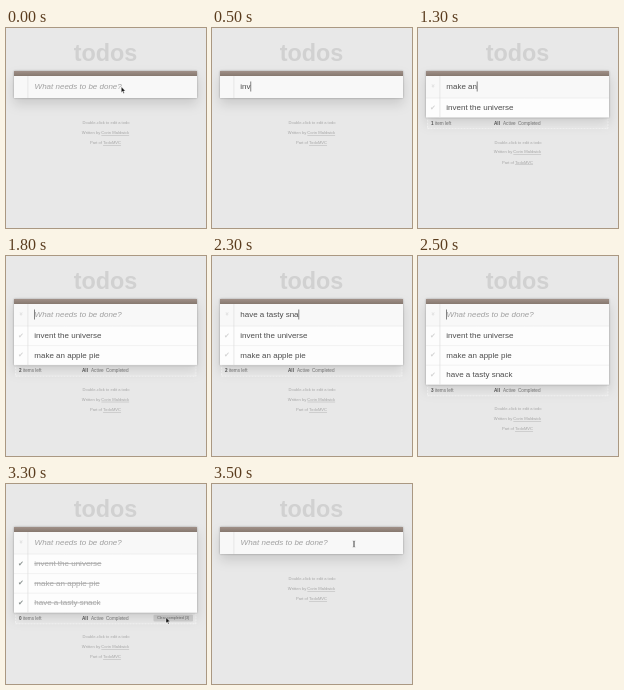
An HTML page for the animation above (3.6 s loop, 200 px wide and 200 px high).

```html
<!DOCTYPE html>
<html lang="en">
<head>
<meta charset="utf-8">
<title>todos</title>
<style>
html, body { margin: 0; width: 100%; height: 100%; overflow: hidden; background: #e8e8e8; }
svg { display: block; width: 100%; height: 100%; }
text { font: 8px "Liberation Sans", Arial, sans-serif; fill: #4d4d4d; white-space: pre; }
.title { font-size: 23.4px; font-weight: bold; fill: #d1d1d1; text-anchor: middle; }
.card { fill: #fdfdfd; filter: drop-shadow(0 .7px 1.2px rgba(0,0,0,.3)) drop-shadow(0 6px 6px rgba(0,0,0,.13)); }
.field { fill: #f8f8f8; }
.margin { stroke: #dedede; stroke-width: .7; }
.rule { stroke: #ccc; stroke-width: .5; stroke-dasharray: .5 .5; }
.hint { font-style: italic; fill: #a0a0a0; }
.mark { font: 7px "DejaVu Sans", sans-serif; fill: #d4d4d4; text-anchor: middle; }
.done text { fill: #a9a9a9; text-decoration: line-through; }
.done .mark { fill: #8b9391; text-decoration: none; }
.item .kill { fill: #a08a88; text-decoration: none; }
.foot text { font-size: 4.67px; fill: #777; }
.foot .bold { font-weight: bold; fill: #555; }
.foot .clear { font-size: 3.67px; text-anchor: middle; fill: #666; }
.info text { font-size: 4.1px; fill: #a6a6a6; text-anchor: middle; }
.link { text-decoration: underline; }
</style>
</head>
<body>
<svg viewBox="0 0 200 200">
  <defs>
    <linearGradient id="brown" x2="0" y2="1">
      <stop offset="0" stop-color="#a09088"/>
      <stop offset="1" stop-color="#86786f"/>
    </linearGradient>
  </defs>
  <text class="title" x="99.5" y="33">todos</text>

  <g class="foot" id="foot">
    <rect x="9.5" y="-2" width="180.5" height="13" fill="#fff" fill-opacity=".2"
      stroke="#fff" stroke-opacity=".8" stroke-width=".7" stroke-dasharray="2 1"/>
    <text x="13" y="7.2"><tspan class="bold" id="count"></tspan><tspan id="left"></tspan></text>
    <text class="bold" x="76" y="7.2">All</text>
    <text x="85" y="7.2">Active</text>
    <text x="100" y="7.2">Completed</text>
    <g id="clear">
      <rect x="147.5" y="2" width="39.5" height="6.8" rx="1" fill="#d2d2d2"/>
      <text class="clear" x="167.2" y="6.7"></text>
    </g>
  </g>

  <rect class="card" id="card" x="8" y="43" width="183" height="27"/>
  <rect class="field" x="8" y="48" width="183" height="22"/>
  <rect x="8" y="43" width="183" height="5" fill="url(#brown)"/>
  <g id="list"></g>
  <path class="margin" id="margin"/>
  <path class="rule" id="rule" d="M8 70H191"/>
  <text class="mark" id="all" transform="translate(13.3 58) rotate(90)" y="0">»</text>

  <text class="hint" id="hint" x="28.6" y="61">What needs to be done?</text>
  <text id="entry" x="28.3" y="61"></text>
  <path id="caret" d="M0 53.5V63.5" stroke="#333" stroke-width=".6"/>

  <g class="info" id="info">
    <text x="100" y="96.3">Double-click to edit a todo</text>
    <text x="99.5" y="106">Written by <tspan class="link">Corin Maldwick</tspan></text>
    <text x="99.5" y="116.2">Part of <tspan class="link">TodoMVC</tspan></text>
  </g>

  <path id="arrow" d="M0 0V5.6L1.3 4.5L2.2 6.6L3.1 6.2L2.2 4.2L4 4.1Z" fill="#111" stroke="#fff" stroke-width=".4"/>
  <path id="beam" d="M-1.2 -3Q0 -3 0 -2V2Q0 3 -1.2 3M1.2 -3Q0 -3 0 -2V2Q0 3 1.2 3" fill="none" stroke="#444" stroke-width=".6"/>
</svg>
<script>
const LOOP = 3600, STEP = 100, ROW = 19.6;
const $ = id => document.getElementById(id);
const show = (el, on) => { el.style.display = on ? "" : "none"; };
const move = (el, x, y) => el.setAttribute("transform", `translate(${x} ${y})`);

// added / done: step at which an item joins the list and is ticked
const todos = [
  { text: "invent the universe", added: 12, done: 27, typed: k => (k - 4) * 3 },
  { text: "make an apple pie", added: 18, done: 29, typed: k => (k - 12) * 3 + 4 },
  { text: "have a tasty snack", added: 25, done: 31, typed: k => Math.round((k - 18) * 3.2) }
];
const CLEARED = 34;

// pointer stops: step, shape, x, y, hovered row
const stops = [
  [0, "arrow", 115.3, 58.8],
  [1, "beam", 122, 64.5],
  [3, ""],
  [26, "arrow", 16, 77.2, 0],
  [28, "arrow", 16, 97, 1],
  [30, "arrow", 16, 116.6, 2],
  [32, "arrow", 92, 127],
  [33, "arrow", 160, 133.5],
  [34, "arrow", 152.5, 120.8],
  [35, "beam", 142, 60]
];

$("list").innerHTML = todos.map((t, i) => `<g class="item" transform="translate(0 ${70 + i * ROW})">
  <text class="mark" x="15" y="11.6">✔</text>
  <text x="28.3" y="12">${t.text}</text>
  <text class="mark kill" x="180.8" y="11.8">✖</text>
  <path class="rule" d="M8 ${ROW}H191"/></g>`).join("");
const rows = [...$("list").children];

function draw(k) {
  const [, shape, px, py, hover] = stops.filter(s => s[0] <= k).pop();
  const live = t => k >= t.added && k < CLEARED;
  const n = todos.filter(live).length;
  const ticked = todos.filter(t => live(t) && k >= t.done).length;
  const open = n - ticked;

  rows.forEach((row, i) => {
    show(row, live(todos[i]));
    row.classList.toggle("done", k >= todos[i].done);
    show(row.querySelector(".kill"), hover === i);
  });

  $("card").setAttribute("height", 27 + n * ROW);
  $("margin").setAttribute("d", `M21.9 48V${70 + n * ROW}`);
  show($("rule"), n);
  show($("all"), n);

  show($("foot"), n);
  move($("foot"), 0, 70 + n * ROW);
  $("count").textContent = open;
  $("left").textContent = open === 1 ? " item left" : " items left";
  show($("clear"), ticked);
  $("clear").lastElementChild.textContent = `Clear completed (${ticked})`;
  move($("info"), 0, n * 19.4);

  const next = todos.find(t => k < t.added);
  const entry = next ? next.text.slice(0, Math.max(0, next.typed(k))) : "";
  $("entry").textContent = entry;
  show($("hint"), !entry);
  show($("caret"), k >= 2 && k < 26);
  move($("caret"), 28.5 + (entry ? $("entry").getComputedTextLength() : 0), 0);

  for (const id of ["arrow", "beam"]) {
    show($(id), shape === id);
    if (shape === id) move($(id), px, py);
  }
}

const start = performance.now();
let last = -1;
function tick() {
  const k = Math.floor((performance.now() - start) % LOOP / STEP);
  if (k !== last) draw(last = k);
  requestAnimationFrame(tick);
}
tick();
</script>
</body>
</html>
```
